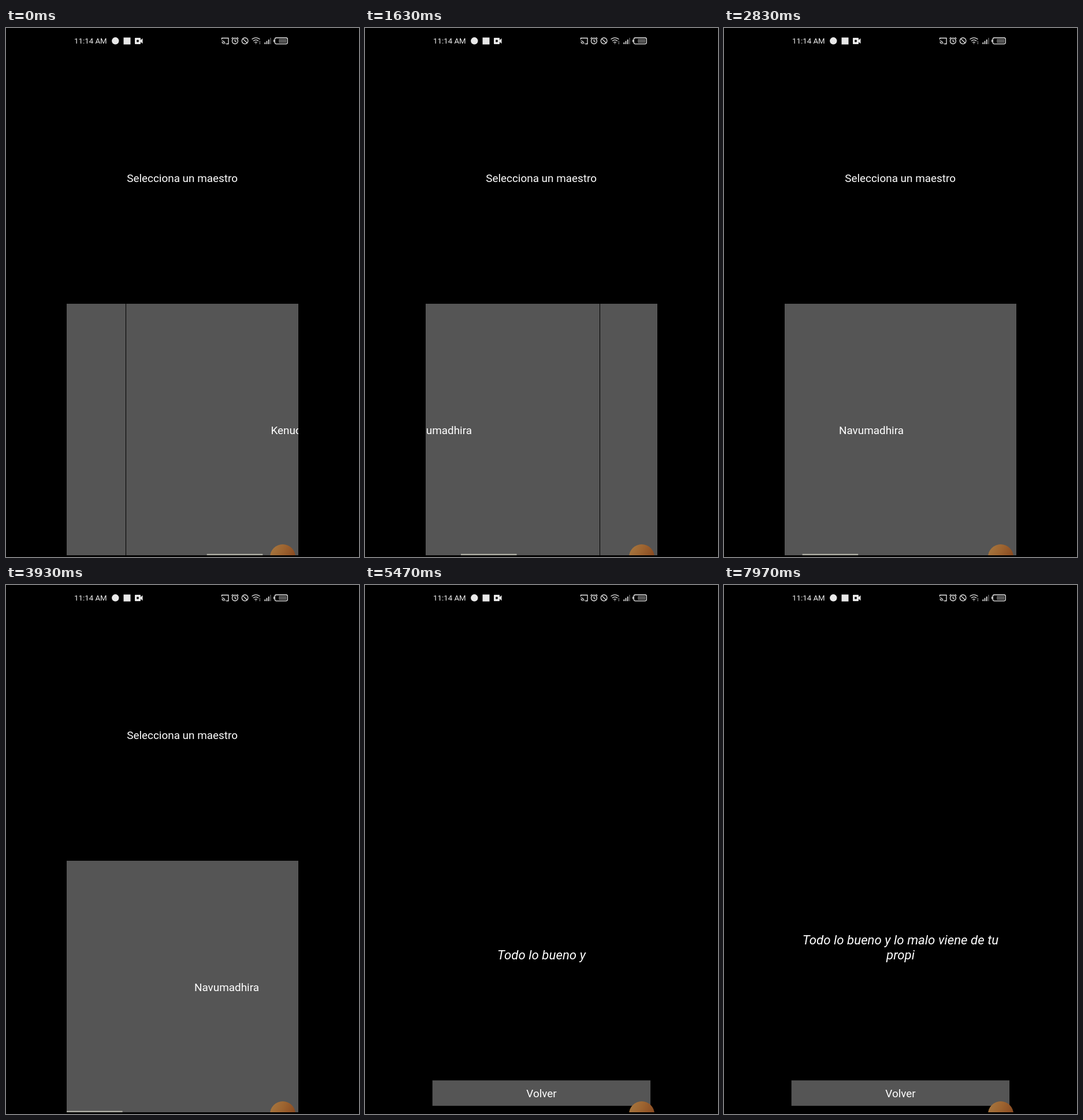
Write an HTML page that moves like this. It is 611 by 917 pixels and loops after 8 s.

```html
<!DOCTYPE html>
<html lang="es">
<head>
<meta charset="utf-8">
<title>Selecciona un maestro</title>
<style>
  @property --scroll { syntax: '<length>'; inherits: true; initial-value: 0px; }

  html, body { margin: 0; width: 100%; height: 100%; overflow: hidden; background: #000; }
  svg { display: block; }
  #stage { width: 100vw; height: 100vh; }
  text { font: 18.9px Roboto, sans-serif; fill: #fff; }
  .mid { text-anchor: middle; }
  .quote text { font-size: 22.3px; font-style: italic; }
  .clock { font-size: 13.3px; fill: #eee; }
  .panel { fill: #555; }
  .line { fill: none; stroke: #e8e8e8; stroke-width: 1.3; }
  .solid { fill: #e8e8e8; }
  .dim { fill: #555; }

  /* Paused: the script sets the time of every animation from one clock. */
  .pages { animation: slide 8s infinite paused; }
  .menu { animation: scroll 8s infinite paused; }
  .items { transform: translateX(calc(var(--scroll) * -1)); }
  .thumb { transform: translateX(calc(var(--scroll) * .241)); fill: #adada3; }

  @keyframes scroll {
    0% { --scroll: 1007px; animation-timing-function: cubic-bezier(.3, .35, .7, .9); }
    20.375% { --scroll: 253px; animation-timing-function: linear; }
    35.375% { --scroll: 127px; animation-timing-function: cubic-bezier(.3, .3, .6, 1); }
    45%, 100% { --scroll: 0px; }
  }
  @keyframes slide {
    0%, 49.25% { transform: translateX(0); animation-timing-function: ease-in-out; }
    53.58%, 100% { transform: translateX(-401px); }
  }
</style>
</head>
<body>
<svg id="stage" viewBox="0 0 611 917">
  <defs>
    <linearGradient id="amber" x1="0" y1="0" x2="1" y2=".5">
      <stop offset="0" stop-color="#a87a42"/>
      <stop offset=".5" stop-color="#9d6430"/>
      <stop offset="1" stop-color="#874820"/>
    </linearGradient>
  </defs>
  <rect width="611" height="917"/>

  <svg x="105" width="401" height="914">
    <g class="pages">
      <g class="menu">
        <text class="mid" x="200.1" y="267.3">Selecciona un maestro</text>
        <svg y="478" width="401" height="436">
          <g class="items">
            <rect class="panel" width="554" height="436"/>
            <rect class="panel" x="555" width="554" height="436"/>
            <rect class="panel" x="1110" width="554" height="436"/>
            <text class="mid" x="277" y="225.5">Navumadhira</text>
            <text class="mid" x="832" y="225.5">Luvong</text>
            <text class="mid" x="1387" y="225.5">Kenuo</text>
          </g>
          <rect class="thumb" y="433.6" width="96.6" height="2.4"/>
        </svg>
      </g>
      <g transform="translate(401)">
        <g class="quote">
          <text class="mid" id="upper" x="200.5" y="622.7"></text>
          <text class="mid" id="lower" x="200.5" y="648.8"></text>
        </g>
        <rect class="panel" x="11.7" y="858.7" width="377.4" height="44.100"/>
        <text class="mid" x="200.5" y="887.7">Volver</text>
      </g>
    </g>
    <circle cx="374" cy="917" r="22" fill="url(#amber)"/>
  </svg>

  <text class="clock" x="118" y="27.3">11:14 AM</text>
  <circle class="solid" cx="189.3" cy="22.3" r="6.2"/>
  <rect class="solid" x="203.5" y="16.5" width="12" height="12"/>
  <path class="solid" fill-rule="evenodd" d="M224 17h8q1 0 1 1v2.8l3.5-2.8v9l-3.5-2.8v2.8q0 1-1 1h-8q-1 0-1-1v-9q0-1 1-1zM228 20.5a2 2 0 1 0 .01 0z"/>

  <g class="line">
    <path d="M373.500 20v-2.500h11.500v10h-4M373.500 22.200a5.500 5.500 0 0 1 5.500 5.500M373.500 25a2.800 2.800 0 0 1 2.800 2.800"/>
    <circle cx="396.4" cy="22.5" r="5"/>
    <path d="M396.400 19.500v3.300l2.200 1.500M390.400 18.500l2.800-2.300M402.400 18.500l-2.800-2.300"/>
    <circle cx="413.6" cy="22.3" r="5.3"/>
    <path d="M410 18.600l7.300 7.400"/>
    <path d="M425.500 19.600q7-5.600 14 0M428 22.500q4.500-3.600 9 0M430.300 25.200q2.200-1.600 4.400 0"/>
  </g>
  <path class="solid" d="M431.300 26.500h2.400l-1.200 1.600zM438.800 23.500h1.200v1.500h-1.200zM438.800 26.200h1.200v1.500h-1.200z"/>
  <path class="solid" d="M447.500 25h1.700v3h-1.700zM450.700 22.500h1.700v5.500h-1.700zM453.900 20h1.700v8h-1.700z"/>
  <rect class="dim" x="457.1" y="17" width="1.7" height="11"/>
  <rect class="line" x="465.3" y="17" width="22" height="10.6" rx="2.5"/>
  <rect class="solid" x="463" y="20.3" width="1.5" height="4"/>
  <rect class="dim" x="472" y="18.7" width="13.7" height="7.2" rx="1"/>
</svg>

<script>
  const LOOP = 8000, TYPE_START = 3850, CHAR_MS = 100;
  const QUOTE = 'Todo lo bueno y lo malo viene de tu propia mente';
  const BREAK = 35, WRAP_AT = 40;
  const upper = document.getElementById('upper');
  const lower = document.getElementById('lower');
  const anims = document.getAnimations();
  let start;

  function type(t) {
    const n = Math.max(0, Math.floor((t - TYPE_START) / CHAR_MS));
    const wrapped = n >= WRAP_AT;
    upper.textContent = wrapped ? QUOTE.slice(0, BREAK) : '';
    lower.textContent = QUOTE.slice(wrapped ? BREAK + 1 : 0, n).trimEnd();
  }

  function frame(now) {
    start ??= now;
    const t = (now - start) % LOOP;
    for (const a of anims) a.currentTime = t;
    type(t);
    requestAnimationFrame(frame);
  }
  requestAnimationFrame(frame);
</script>
</body>
</html>
```
